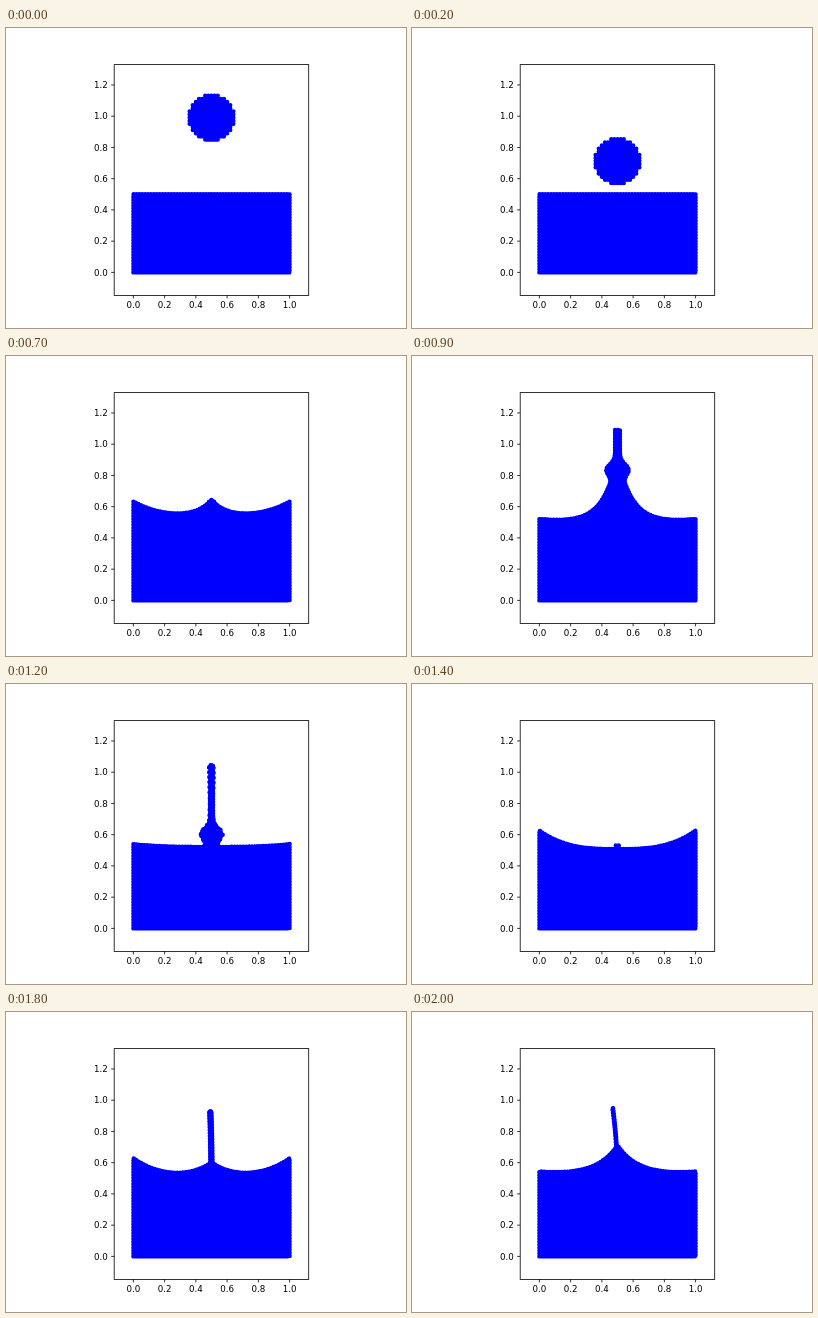
These frames come from a looping animation (400x300 px, 2.1 s). An HTML page with a canvas:

```html
<!DOCTYPE html>
<html lang="en">
<head>
<meta charset="utf-8">
<title>Falling drop</title>
<style>
  html, body { margin: 0; width: 100%; height: 100%; overflow: hidden; background: #fff; }
  canvas, svg { position: absolute; left: 0; top: 0; width: 400px; height: 300px; }
  text { font: 8.68px "DejaVu Sans", sans-serif; fill: #000; }
</style>
</head>
<body>
<canvas id="fluid"></canvas>
<svg id="axes" viewBox="0 0 400 300" fill="none" stroke="#000" stroke-width="0.8">
  <rect x="108.2" y="36.6" width="194.5" height="230.8"/>
</svg>
<script>
const STEP = 100, STEPS = 21;
const UNIT = 156.2, MID = 205.5, FLOOR = 244.4, R = 2.2;
const BLUE = '#0000ff';
const px = x => MID + (x - 0.5) * UNIT;
const py = y => FLOOR - y * UNIT;

// Axes
const svg = document.getElementById('axes');
function add(tag, attrs, text) {
  const el = document.createElementNS('http://www.w3.org/2000/svg', tag);
  for (const k in attrs) el.setAttribute(k, attrs[k]);
  if (text) el.textContent = text;
  svg.appendChild(el);
}
for (let i = 0; i <= 6; i++) {
  const v = i / 5, label = v.toFixed(1), x = px(v), y = py(v);
  if (i <= 5) {
    add('path', { d: `M${x} 267.4v3` });
    add('text', { x, y: 279.6, 'text-anchor': 'middle', stroke: 'none' }, label);
  }
  add('path', { d: `M108.2 ${y}h-3` });
  add('text', { x: 101.9, y: y + 3.2, 'text-anchor': 'end', stroke: 'none' }, label);
}

const canvas = document.getElementById('fluid');
const ctx = canvas.getContext('2d');
const scale = window.devicePixelRatio || 1;
canvas.width = 400 * scale;
canvas.height = 300 * scale;
ctx.scale(scale, scale);
ctx.lineCap = ctx.lineJoin = 'round';

// Filled shape with an edge of round particles
function body(points) {
  ctx.beginPath();
  points.forEach(p => ctx.lineTo(p[0], p[1]));
  ctx.closePath();
  ctx.fillStyle = ctx.strokeStyle = BLUE;
  ctx.fill();
  ctx.lineWidth = 1.4 * R;
  ctx.setLineDash([]);
  ctx.stroke();
  ctx.lineWidth = 2 * R;
  ctx.setLineDash([0, 2.9]);
  ctx.stroke();
}

// Mirrors [offset, y, shift] points about the centre line
function mirror(half) {
  const left = half.map(([d, y, s = 0]) => [MID + s - d, y]).reverse();
  const right = half.map(([d, y, s = 0]) => [MID + s + d, y]);
  return left.concat(right);
}

// Pool below a half profile of [distance, height] in axis units
function pool(half) {
  body(mirror([...half, [0.5, 0]].map(([d, h]) => [d * UNIT, py(h)])));
}

function drop(n) {
  const cy = 1 - 0.0487 * (n + 0.43) ** 2;
  const r = 0.15, gap = 0.02;
  ctx.fillStyle = BLUE;
  ctx.beginPath();
  ctx.arc(MID, py(cy), r * UNIT - 1.5, 0, 7);
  for (let i = -7; i <= 7; i++) for (let j = -7; j <= 7; j++) {
    if (Math.hypot(i, j) * gap > r) continue;
    const x = px(0.5 + i * gap), y = py(cy + j * gap);
    ctx.moveTo(x + R, y);
    ctx.arc(x, y, R, 0, 7);
  }
  ctx.fill();
}

// Crown that spreads and lifts the level after the impact
function splash(n) {
  const k = n - 3;
  const w = 0.18 + 0.118 * k, side = 0.505 + 0.035 * k, top = 0.632;
  pool([[0, top], [w, top], [w - 0.013, side + 0.012], [w + 0.02, side + 0.006], [0.5, side]]);
  ctx.fillStyle = '#fff';
  for (let d = -6; k === 2 && d <= 6; d += 4) {
    ctx.beginPath();
    ctx.moveTo(MID + d - 0.9, 142);
    ctx.lineTo(MID + d + 0.9, 142);
    ctx.lineTo(MID + d, 148);
    ctx.fill();
  }
}

// Smooth swell, 1 at zero and 0 from w on
const swell = (x, w) => Math.abs(x) < w ? Math.cos(Math.PI * x / (2 * w)) ** 2 : 0;

// Sloshing: the water rises at the walls, then in the middle
function surface(n) {
  const rise1 = swell(n - 9, 3), rise2 = swell(n - 20, 4);
  const back1 = swell(n - 6, 3), back2 = swell(n - 16, 4);
  const base = 0.522 + 0.03 * back1 - 0.02 * rise1 - 0.027 * back2;
  const peak = 0.42 * rise1 + 0.19 * rise2;
  const width = n < 12 ? 0.092 : 0.13;
  const wall = 0.018 + 0.1 * back1 + 0.2 * back2;
  const half = [];
  for (let d = 0; d < 0.501; d += 0.01) {
    half.push([d, base + peak * Math.exp(-d / width) + wall * (2 * d) ** 3]);
  }
  pool(half);
}

const fling = (y, v, n) => y - v * n + 7.6 * n * n;

// First jet: thin column above a wider bulb, both in free flight
function tallJet(n) {
  const k = n - 9, age = Math.max(k, 0);
  const top = fling(74, 20.5, k);
  const bulb = Math.min(fling(113, 10.8, k), 200);
  const half = [];
  for (let y = top; y < Math.max(bulb + 20, 170); y += 2.5) {
    const dy = y - bulb;
    const thin = 2.5 - 0.3 * age + 0.3 * age * Math.sin(y * 1.3);
    half.push([thin + 6.5 * Math.exp(-dy * dy / 49) + 4.5 / (1 + Math.exp(-dy / 4)), y]);
  }
  body(mirror(half));
}

// Second jet: a thread that bends to the left
function thinJet(n) {
  const top = fling(90, 1.6, n - 19), base = 168;
  const age = (n - 16) / 4;
  const half = [];
  for (let u = 1; u > 0; u -= 0.05) {
    half.push([2 - 1.6 * age, base + (top - base) * u, -4.8 * (age * u) ** 2]);
  }
  body(mirror(half));
}

function draw(n) {
  ctx.clearRect(0, 0, 400, 300);
  if (n < 3) {
    pool([[0, 0.5], [0.5, 0.5]]);
    drop(n);
  } else if (n < 6) {
    splash(n);
  } else {
    surface(n);
    if (n >= 7 && n <= 14) tallJet(n);
    if (n >= 16) thinJet(n);
  }
}

const start = performance.now();
let shown = -1;
function tick() {
  const n = Math.floor((performance.now() - start) / STEP) % STEPS;
  if (n !== shown) draw(shown = n);
  requestAnimationFrame(tick);
}
tick();
</script>
</body>
</html>
```
